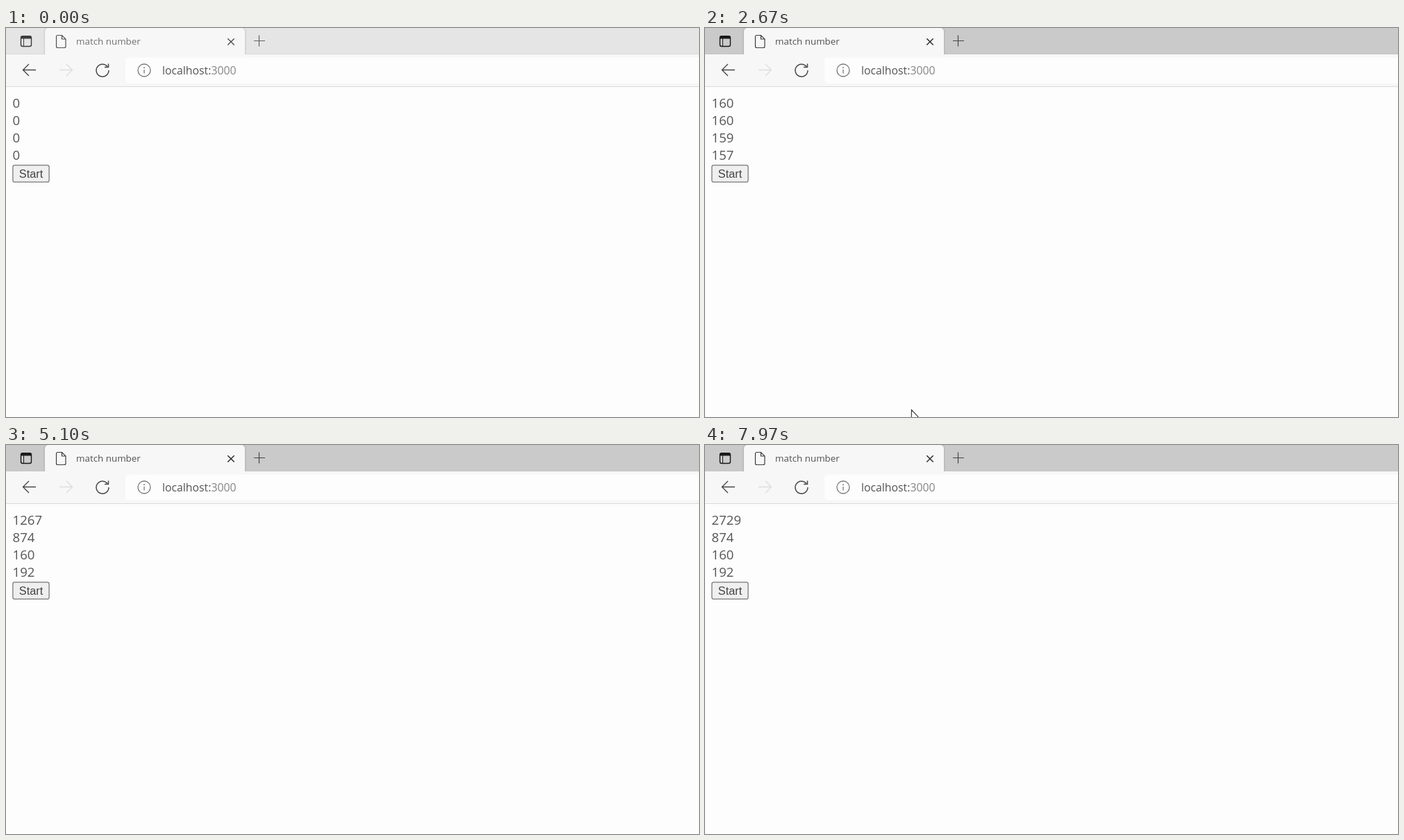
An HTML page with a canvas for the animation above (8 s loop, 998 by 561 pixels).

```html
<!DOCTYPE html>
<html lang="en">
<head>
<meta charset="utf-8">
<title>match number</title>
<style>
  html, body { margin: 0; width: 100%; height: 100%; overflow: hidden; background: #fdfdfd; }
  canvas { display: block; }
</style>
</head>
<body>
<canvas id="stage" width="998" height="561"></canvas>
<script>
const ctx = document.getElementById('stage').getContext('2d');
const LOOP = 8000;
const START = 1944;
const PAPER = '#fdfdfd';
const CHROME = '#f7f7f7';
const SANS = '"Open Sans", "Noto Sans", sans-serif';
const ARIAL = '"Liberation Sans", Arial, sans-serif';

// Every counter climbs until it meets its number; lag is how far it trails the first.
const counters = [
  { stop: Infinity, lag: 0 },
  { stop: 874, lag: 0 },
  { stop: 160, lag: 1 },
  { stop: 192, lag: 3 }
];

const clamp = v => Math.min(1, Math.max(0, v));
const mix = (a, b, p) => a + (b - a) * p;
const smooth = p => p * p * (3 - 2 * p);
const progress = (t, from, to) => clamp((t - from) / (to - from));

// The counters share one queue, so each speeds up as others finish, up to a limit.
function leadCount(t) {
  let count = 0;
  for (let left = t - START; left > 0;) {
    const running = counters.filter(c => count < c.stop + c.lag);
    const interval = Math.max(1.963, 1.133 * running.length);
    const nextStop = Math.min(...running.map(c => c.stop + c.lag));
    const gain = Math.min(left / interval, nextStop - count);
    if (gain === left / interval) return count + gain;
    count = nextStop;
    left -= gain * interval;
  }
  return count;
}

function pointerAt(t) {
  const arrive = smooth(progress(t, 1380, 1870));
  const leave = smooth(progress(t, 2320, 2720));
  const away = 1 - arrive + leave;
  return [mix(61, leave ? 308 : 400, away), mix(208, 566, away)];
}

function grey(from, to, p) {
  const v = Math.round(mix(from, to, p));
  return `rgb(${v},${v},${v})`;
}

function rect(x, y, w, h, color) {
  ctx.fillStyle = color;
  ctx.fillRect(x, y, w, h);
}

function box(x, y, w, h, r, fill, stroke, width = 1) {
  ctx.beginPath();
  ctx.roundRect(x, y, w, h, r);
  if (fill) { ctx.fillStyle = fill; ctx.fill(); }
  if (stroke) { ctx.strokeStyle = stroke; ctx.lineWidth = width; ctx.stroke(); }
}

function line(d, color, width = 1.3) {
  ctx.strokeStyle = color;
  ctx.lineWidth = width;
  ctx.stroke(new Path2D(d));
}

function text(str, x, y, size, color, family = SANS) {
  ctx.font = `${size}px ${family}`;
  ctx.fillStyle = color;
  ctx.fillText(str, x, y);
  return x + ctx.measureText(str).width;
}

function drawTabStrip(focus) {
  const ink = grey(60, 25, focus);
  rect(0, 0, 998, 38, grey(229, 202, focus));
  rect(0, 37, 998, 1, grey(216, 196, focus));

  ctx.save();
  ctx.shadowColor = 'rgba(0,0,0,0.25)';
  ctx.shadowBlur = 3;
  box(56, 0, 288, 42, [5, 5, 0, 0], CHROME);
  ctx.restore();

  box(21.5, 11.8, 15, 14.7, 2.5, null, ink, 1.4);
  box(21, 11.5, 16, 4, [2.5, 2.5, 0, 0], ink);
  line('M25.5 15V26', ink, 1);

  line('M74.5 10.5H80.5L86 16V26.5Q86 28.5 84 28.5H74.5Q72.5 28.5 72.5 26.5V12.5Q72.5 10.5 74.5 10.5ZM80.5 10.5V16H86',
    grey(80, 60, focus), 1.2);
  text('match number', 101, 24, 13.4, grey(112, 80, focus));
  line('M319.3 15.2L328.7 24.6M328.7 15.2L319.3 24.6', grey(80, 40, focus), 1.4);
  line('M357 18.5H373M364.5 10.5V26.5', grey(100, 70, focus), 1.2);
}

function drawToolbar() {
  rect(0, 38, 998, 46, CHROME);
  rect(0, 84, 998, 1, '#dadada');
  box(172, 42.5, 840, 37, 5, PAPER);

  line('M43 60.5H24.5M33 52L24.5 60.5L33 69', '#484848', 1.4);
  line('M77 60.5H95.5M87 52L95.5 60.5L87 69', '#dedee2', 1.4);
  line('M146 55.5A9 9 0 1 0 148 61M147.5 51.5V56.5H142', '#484848', 1.5);

  line('M208 61A9 9 0 1 1 190 61A9 9 0 1 1 208 61M199 60V65.5', '#777', 1.3);
  rect(198.2, 56.3, 1.6, 1.8, '#777');
  const portX = text('localhost:', 225, 67, 15.8, '#555');
  text('3000', portX, 67, 15.8, '#858585');
}

function drawPage(t, hover) {
  const lead = Math.floor(leadCount(t));
  rect(0, 85, 998, 476, PAPER);
  counters.forEach(({ stop, lag }, row) => {
    const value = Math.max(0, Math.min(stop, lead - lag));
    text(String(value), 9.5, 114.5 + row * 25.1, 18.6, '#555');
  });
  box(9.9, 197.8, 52.2, 24.4, 2.5, hover ? '#e4e4e4' : '#efefef', hover ? '#555' : '#777', 1.25);
  text('Start', 18.8, 216, 16.3, '#444', ARIAL);
}

function drawPointer(x, y) {
  ctx.save();
  ctx.translate(x, y);
  const arrow = new Path2D('M0 0V19L4.3 15L7.3 22.2L10.3 21L7.2 13.8H13Z');
  ctx.fillStyle = '#fff';
  ctx.fill(arrow);
  ctx.strokeStyle = '#333';
  ctx.lineWidth = 1.1;
  ctx.stroke(arrow);
  ctx.restore();
}

function draw(t) {
  const focus = clamp(Math.floor((t - 1095) / 35) / 3);
  const [x, y] = pointerAt(t);
  const hover = x >= 10 && x <= 62 && y >= 198 && y <= 222;
  drawTabStrip(focus);
  drawToolbar();
  drawPage(t, hover);
  if (y < 561) drawPointer(x, y);
}

// The screen refreshes 30 times a second, on times rounded to 10 ms.
function tick(now) {
  const step = Math.floor((now % LOOP) * 0.03 + 0.11);
  draw(Math.round(step * 10 / 3) * 10);
  requestAnimationFrame(tick);
}

draw(0);
requestAnimationFrame(tick);
</script>
</body>
</html>
```
